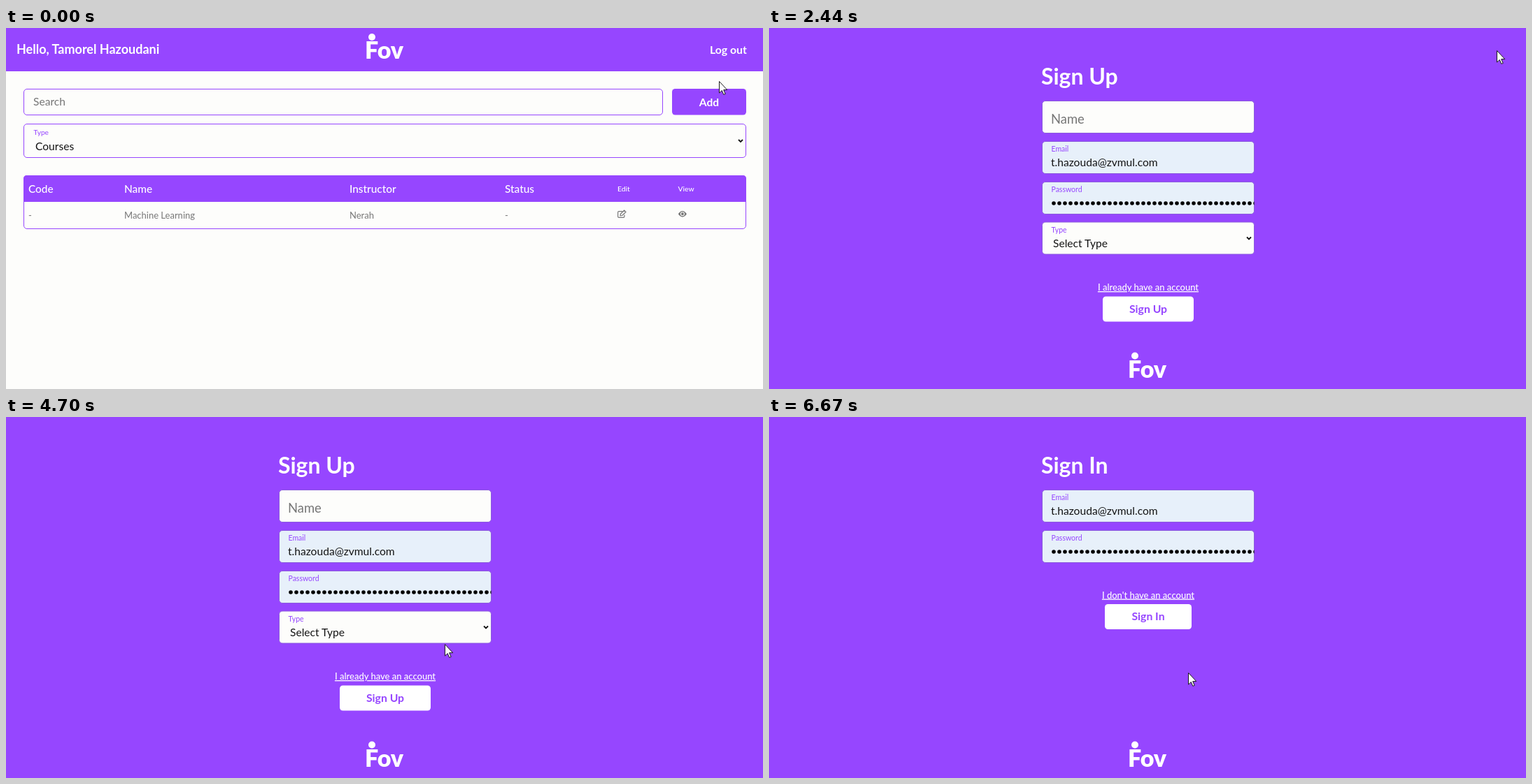
An HTML page for the animation above (6.74 s loop, 1082x517 px).

```html
<!DOCTYPE html>
<html lang="en">
<head>
<meta charset="utf-8">
<title>Course portal</title>
<style>
  html, body { margin: 0; width: 100%; height: 100%; overflow: hidden; background: #fdfdfb; }
  svg { display: block; font-family: Lato, "Open Sans", sans-serif; }
</style>
</head>
<body>
<svg id="stage" width="1082" height="517" viewBox="0 0 1082 517"></svg>
<script>
const LOOP = 6740, LOGOUT = 2440, SIGN_IN = 6140;
const PURPLE = '#9646ff', PAPER = '#fdfdfb', AUTOFILL = '#e7f0fa', GREY = '#777', INK = '#141414';

const text = (x, y, size, fill, string, extra = '') =>
  `<text x="${x}" y="${y}" font-size="${size}" fill="${fill}" ${extra}>${string}</text>`;
const box = (x, y, w, h, fill, extra = '') =>
  `<rect x="${x}" y="${y}" width="${w}" height="${h}" rx="4.5" fill="${fill}" ${extra}/>`;
const outline = (x, y, w, h, fill = PAPER, stroke = PURPLE) =>
  box(x + .5, y + .5, w - 1, h - 1, fill, `stroke="${stroke}"`);
const chevron = (x, y) =>
  `<path d="M${x - 3} ${y - 1.5}l3 3 3-3" fill="none" stroke="#111" stroke-width="1.8"/>`;
const BOLD = 'font-weight="700"', MEDIUM = 'font-weight="500"', CENTER = 'text-anchor="middle"';

const logo = y => `<circle cx="523" cy="${y + 13}" r="5" fill="#fff"/>` +
  text(513, y + 44, 34, '#fff', 'Fov', 'font-weight="900"');

const editIcon = `<g fill="none" stroke="${GREY}" stroke-width="1.2">
  <path d="M881 262.6H876Q874.6 262.6 874.6 264V270Q874.6 271.4 876 271.4H882.5Q883.9 271.4 883.9 270V267.5"/>
  <path d="M878 268.8L878.4 266.3 883.6 261.2 886 263.5 880.7 268.5Z"/></g>`;
const eyeIcon = `<path d="M960.8 266.3Q966.9 257.6 973 266.3Q966.9 275 960.8 266.3Z" fill="${GREY}"/>
  <circle cx="966.9" cy="266.3" r="2.5" fill="${GREY}" stroke="${PAPER}" stroke-width="1.1"/>`;

function homePage() {
  const columns = [[32, 'Code', '-'], [169, 'Name', 'Machine Learning'],
    [491, 'Instructor', 'Nerah'], [713, 'Status', '-']];
  return `<rect width="1082" height="517" fill="${PAPER}"/><rect width="1082" height="62" fill="${PURPLE}"/>` +
    text(15, 37, 18, '#fff', 'Hello, Tamorel Hazoudani', BOLD) + logo(0) +
    text(1006, 37, 15.8, '#fff', 'Log out', BOLD) +
    outline(25, 87, 914, 38) + text(39, 111, 15.6, '#757575', 'Search') +
    box(952, 87, 106, 37.5, PURPLE) + text(1005, 111.5, 15.6, '#fff', 'Add', `${BOLD} ${CENTER}`) +
    outline(25, 137, 1033, 49) + text(39.5, 153, 10.2, PURPLE, 'Type') +
    text(42, 175, 15.6, INK, 'Courses') + chevron(1050, 161.5) +
    outline(25, 211, 1033, 77) +
    `<path d="M25 249V216Q25 211 30 211H1053Q1058 211 1058 216V249Z" fill="${PURPLE}"/>` +
    columns.map(([x, head, cell]) =>
      text(x, 236, 15.4, '#fff', head, MEDIUM) + text(x, 273, 13, GREY, cell)).join('') +
    text(874, 234, 10.3, '#fff', 'Edit', MEDIUM) + text(960.5, 234, 10.3, '#fff', 'View', MEDIUM) +
    editIcon + eyeIcon;
}

const input = (y, fill) => outline(390, y, 304, 47, fill, '#8a5bdc');
const field = (y, label, value, fill) => input(y, fill) +
  text(403.5, y + 15, 10.5, PURPLE, label) + value;
const emailField = y =>
  field(y, 'Email', text(403, y + 35.5, 15.6, INK, 't.hazouda@zvmul.com'), AUTOFILL);
const passwordField = y => field(y, 'Password',
  `<svg width="693.5" height="517"><path d="M407 ${y + 31}H700" stroke="#000" stroke-width="5.6"
    stroke-linecap="round" stroke-dasharray="0 8"/></svg>`, AUTOFILL);

function formPage(title, fields, link, linkY, buttonWidth) {
  return `<rect width="1082" height="517" fill="${PURPLE}"/>` +
    text(389, 81, 32, '#fff', title, BOLD) + fields +
    text(542, linkY, 13, '#fff', link, `${MEDIUM} ${CENTER} text-decoration="underline"`) +
    box(542 - buttonWidth / 2, linkY + 8.5, buttonWidth, 36, '#fff') +
    text(542, linkY + 31.5, 15.8, PURPLE, title, `${BOLD} ${CENTER}`) + logo(456.5);
}

const signUpPage = formPage('Sign Up',
  input(104, PAPER) + text(403, 137, 18.4, '#757575', 'Name') +
  emailField(162) + passwordField(220) +
  field(277.5, 'Type', text(406, 314, 15.6, INK, 'Select Type') + chevron(686, 301), PAPER),
  'I already have an account', 376, 130);
const signInPage = formPage('Sign In', emailField(104) + passwordField(162),
  "I don't have an account", 259.5, 124);

const pages = [homePage(), signUpPage, signInPage];
document.getElementById('stage').innerHTML =
  pages.map(content => `<g class="page">${content}</g>`).join('') +
  `<g id="cursor" fill="#fff" stroke="#1a1a1a" stroke-linejoin="round">
    <path id="arrow" d="M.5.5V17L4.3 13.5 6.8 19.4 9.2 18.4 6.7 12.6H11.8Z"/>
    <g id="hand"><path d="M-2 1.8Q0-1.2 2 1.8V7.5Q4 6 5 8Q7 6.8 8 9Q11 8 11.2 11.5V15Q11 18 9 20V22.5H0V20.5
      Q-2.5 17.5-4.6 14Q-6 10.8-3.6 10.7L-2 12.5Z"/><path d="M2 8V11.5M5 8.5V11.5M8 9.5V12"/></g></g>`;

// Pointer path: time, x, y
const path = [
  [0, 1019, 76], [499, 1019, 76], [500, 1034, 80], [639, 1034, 80], [640, 1041, 32], [2439, 1041, 32],
  [2440, 1040, 32], [3740, 1040, 32], [3840, 1039, 34], [4165, 1039, 34], [4240, 1000, 66],
  [4370, 850, 185], [4500, 715, 280], [4700, 627, 325], [4940, 608, 349], [5200, 599, 366], [LOOP, 599, 366]
];

function pointerAt(time) {
  const next = path.findIndex(key => key[0] > time);
  const [t0, x0, y0] = path[next - 1], [t1, x1, y1] = path[next];
  const k = (time - t0) / (t1 - t0);
  return [x0 + (x1 - x0) * k, y0 + (y1 - y0) * k];
}

const layers = document.querySelectorAll('.page');
const cursor = document.getElementById('cursor');
const arrow = document.getElementById('arrow');
const hand = document.getElementById('hand');
const show = (element, visible) => element.style.display = visible ? '' : 'none';

function draw(now) {
  const time = now % LOOP;
  const page = time < LOGOUT ? 0 : time < SIGN_IN ? 1 : 2;
  const [x, y] = pointerAt(time);
  const overLink = page === 0 ? y < 50 : page === 1 && y >= 362;
  layers.forEach((layer, i) => show(layer, i === page));
  show(arrow, !overLink);
  show(hand, overLink);
  cursor.setAttribute('transform', `translate(${x.toFixed(1)} ${y.toFixed(1)})`);
  requestAnimationFrame(() => draw(performance.now() - start));
}

const start = performance.now();
draw(0);
</script>
</body>
</html>
```
